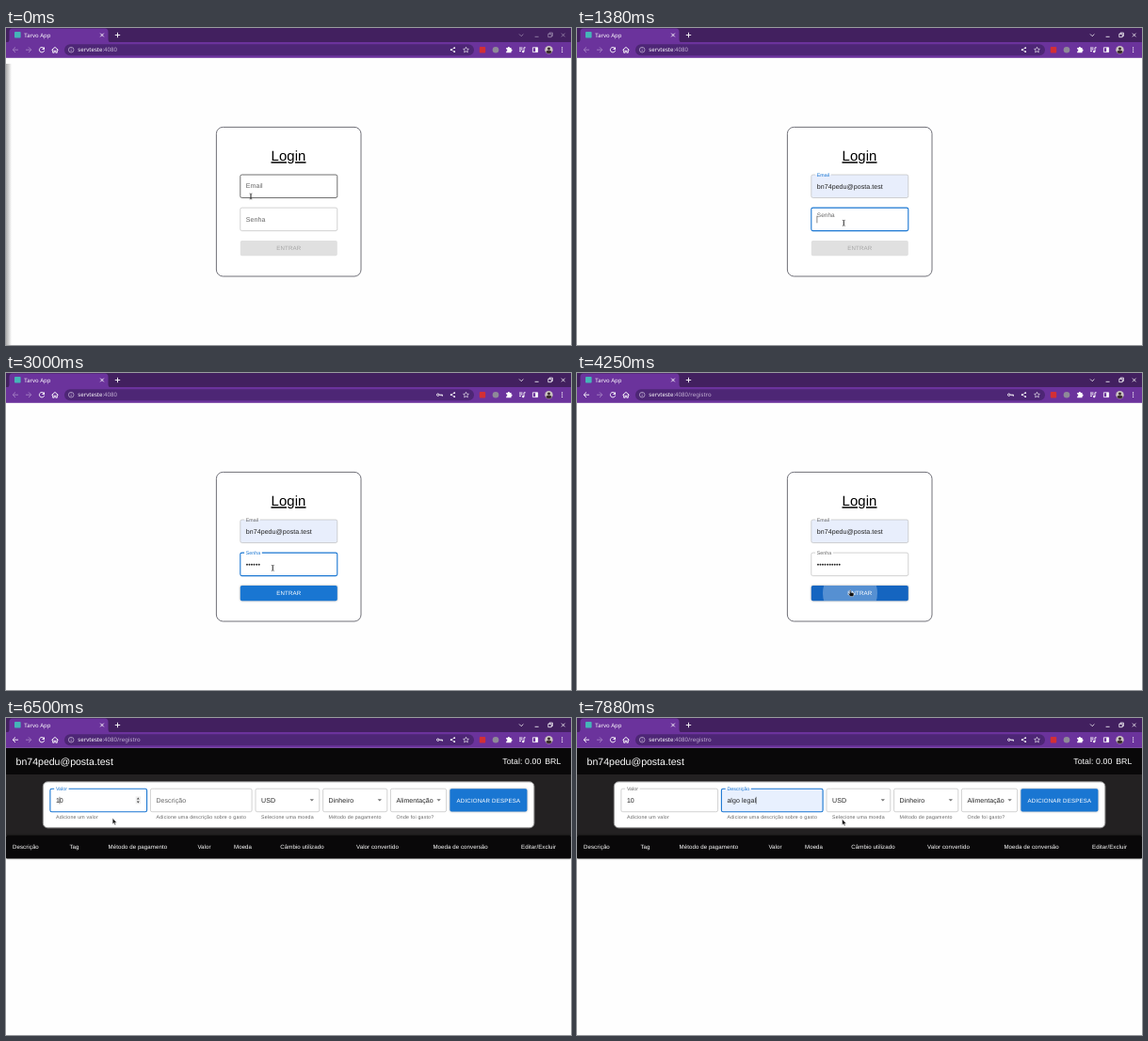
Recreate the animation shown at these times as an HTML page. Size 600 px wide and 337 px high, loop 8 s.

```html
<!DOCTYPE html>
<html lang="pt">
<head>
<meta charset="utf-8">
<title>Login</title>
<style>
html, body { margin: 0; width: 100%; height: 100%; overflow: hidden; background: #fff; }
svg { display: block; width: 100vw; height: 100vh; }
text { font-family: "Liberation Sans", Arial, sans-serif; text-rendering: geometricPrecision; white-space: pre; }
.ui { font-family: "Noto Sans", sans-serif; }
.raised { filter: drop-shadow(0 .8px .8px rgba(0, 0, 0, .35)); }
</style>
</head>
<body>
<svg id="stage" viewBox="0 0 600 337">
  <defs>
    <linearGradient id="edge"><stop stop-color="#777" stop-opacity=".6"/><stop offset="1" stop-color="#777" stop-opacity="0"/></linearGradient>
    <clipPath id="enterClip"><rect x="248.8" y="226" width="103" height="16.2" rx="1.8"/></clipPath>
  </defs>
  <g id="scene"></g>
</svg>
<script>
const STEP = 125, LOOP = 8000;
const PX = 600 / 1366;              // size of one page pixel on the stage
const BODY = 16 * PX, SMALL = 12 * PX, BUTTON = 14 * PX;
const BLUE = '#1976d2', GREY = '#666', INK = '#212121';
const EMAIL = 'bn74pedu@posta.test';
const NAVIGATE = 34, WALLET = 35;   // steps at which address and page change

const scene = document.getElementById('scene');
const pen = document.createElement('canvas').getContext('2d');
pen.font = '100px "Liberation Sans", Arial, sans-serif';
const widthOf = s => (pen.measureText(s).width / 100 + s.length * .0094) * BODY;

const rect = (x, y, w, h, fill, r = 0, extra = '') =>
  `<rect x="${x}" y="${y}" width="${w}" height="${h}" rx="${r}" fill="${fill}" ${extra}/>`;
const circle = (x, y, r, fill) => `<circle cx="${x}" cy="${y}" r="${r}" fill="${fill}"/>`;
const line = (d, color = '#fff', width = .9) =>
  `<path d="${d}" fill="none" stroke="${color}" stroke-width="${width}"/>`;
const shape = (d, fill = '#fff', extra = '') => `<path d="${d}" fill="${fill}" ${extra}/>`;
const text = (s, x, y, size, fill, spacing = 0, extra = '') =>
  `<text x="${x}" y="${y}" font-size="${size}" fill="${fill}" letter-spacing="${spacing * size}" ${extra}>${s}</text>`;

// Rounded outline with an optional gap in the top edge
function outline(x, y, w, h, gap, color, width) {
  const r = 1.76, start = x + 4.3 + gap;
  return line(`M${start} ${y}H${x + w - r}q${r} 0 ${r} ${r}V${y + h - r}q0 ${r} ${-r} ${r}H${x + r}
    q${-r} 0 ${-r} ${-r}V${y + r}q0 ${-r} ${r} ${-r}H${x + 4.3}`, color, width);
}

// Text field that has the focus from step `from` up to step `to`
function field(k, { x, y, w, label, value = '', from, to, fill = 'none', hover, caretAt = value }) {
  const h = 24.5, focused = k >= from && k < to, labelFocused = k > from && k <= to;
  const shrink = value && k < from || k > from ? 1 : k === from ? (value ? 1 : .35) : 0;
  const scale = 1 - .25 * shrink, baseline = y + PX * (16 - 25 * shrink + 17 * scale);
  const border = focused ? BLUE : hover ? '#333' : '#bfbfbf';
  const caretX = x + 6.1 + widthOf(caretAt);
  return rect(x, y, w, h, fill, 1.76)
    + outline(x, y, w, h, shrink === 1 ? widthOf(label) * .75 + 3.2 : 0, border, focused ? 1.1 : .7)
    + text(label, x + 6, baseline, BODY * scale, labelFocused ? BLUE : GREY, .0094)
    + text(value, x + 6, y + 14.6, BODY, INK, .0094)
    + (focused && (k - from) % 8 < 4 ? line(`M${caretX} ${y + 8.6}v7.6`, '#111', .5) : '');
}

function select(x, w, value) {
  return outline(x, 75.2, w, 24.5, 0, '#bfbfbf', .7)
    + text(value, x + 6, 89.8, BODY, INK, .0094)
    + shape(`M${x + w - 10.2} 86.3h4.4l-2.2 2.2z`, '#757575');
}

function button(x, y, w, h, label, fill, ink) {
  return rect(x, y, w, h, fill, 1.76, ink === '#fff' ? 'class="raised"' : '')
    + text(label, x + w / 2, y + h / 2 + 2.2, BUTTON, ink, .02857, 'text-anchor="middle"');
}

function browser(k) {
  const away = k >= NAVIGATE, win = k < 2 ? '#a08fb0' : '#fff', dim = '#a583c4';
  const back = away ? '#fff' : dim;
  return rect(0, 0, 600, 16, '#42205f')
    + shape('M0 15.5Q3.5 15.5 3.5 12V4Q3.5 .5 7 .5H105Q108.5 .5 108.5 4V12Q108.5 15.5 112 15.5z', '#6b339c')
    + rect(0, 15, 600, 16.8, '#6b339c')
    + rect(62, 17.2, 435, 12, '#4d2675', 6)
    + rect(9, 4, 6.6, 6.6, '#45b5b8', .8)
    + text('Tarvo App', 19.3, 9.7, 6, '#fff', 0, 'class="ui"')
    + line('M100.2 5.7l3.6 3.6m0-3.6l-3.6 3.6M115.8 7.5h5.4m-2.7-2.7v5.4')
    // window controls
    + line('M545 6.5l2.2 2.2 2.2-2.2M561.6 9.3h4M575.8 6.3h3.4v3.4h-3.4zM577 6.3v-1.2h3.4v3.4h-1.2M589.9 5.7l3.6 3.6m0-3.6l-3.6 3.6', win, .8)
    // navigation
    + line('M13 23.2H7.4m2.6-2.8l-2.8 2.8 2.8 2.8', back)
    + line('M21 23.2h5.6m-2.6-2.8l2.8 2.8-2.8 2.8', dim)
    + line('M40.1 21.4a2.7 2.7 0 1 0 .6 2.4') + shape('M41 19.9v3h-3z')
    + line('M48.5 23.4l3.5-3 3.5 3M49.7 22.8v3.4h1.5v-2h1.6v2h1.5v-3.4')
    + line('M66.4 23.2a2.8 2.8 0 1 0 5.6 0a2.8 2.8 0 1 0-5.6 0M69.2 22.8v2m0-3.4v.7', '#e0d5ea', .6)
    + `<text class="ui" x="76.3" y="25.3" font-size="6.1" fill="#fff">servteste<tspan fill="#c4b3d4">:4080${away ? '/registro' : ''}</tspan></text>`
    // address bar actions
    + (k >= 15 ? line('M457.5 23.2a1.2 1.2 0 1 0 2.4 0a1.2 1.2 0 1 0-2.4 0M460 23.2h3.5v1.4m-1.4-1.4v1.2') : '')
    + line('M476.1 21.2l-3.4 2 3.4 2', '#fff', .6)
    + circle(476.2, 21.2, .9, '#fff') + circle(472.7, 23.2, .9, '#fff') + circle(476.2, 25.2, .9, '#fff')
    + line('M488.5 20.3l.9 1.9 2 .2-1.5 1.4.4 2.1-1.8-1.1-1.8 1.1.4-2.1-1.5-1.4 2-.2z', '#fff', .6)
    // extensions and menu
    + rect(502.8, 20, 6.4, 6.4, '#d32f35', 1) + circle(520, 23.2, 3.3, '#8e8a98')
    + shape('M531.2 21h1.6a1.1 1.1 0 0 1 2.2 0h1.5v1.6a1.1 1.1 0 0 1 0 2.2v1.5h-5.3v-1.5a1.1 1.1 0 0 0 0-2.2z')
    + line('M545 21h3.5m-3.5 1.8h3.5m-3.5 1.8h2M550 25v-4.2h1.7') + circle(549.2, 25.1, 1.2, '#fff')
    + line('M559.4 20.8h5.2v4.8h-5.2z', '#fff', .8) + rect(562.2, 20.8, 2.4, 4.8, '#fff')
    + circle(576.5, 23.2, 4.2, '#c9c3c0') + circle(576.5, 22, 1.5, '#3a2b2e') + shape('M573.5 26.1q0-2.4 3-2.4t3 2.4q-3 2.4-6 0z', '#3a2b2e')
    + [21, 23.2, 25.4].map(y => circle(590.6, y, .65, '#fff')).join('');
}

function passwordLength(k) {
  if (k < 15) return 0;
  if (k < 22) return Math.min(4, k - 14);
  if (k < 25) return Math.min(6, k - 17);
  return Math.min(10, k - 18);
}

function loginPage(k) {
  const count = passwordLength(k);
  const fill = count < 6 ? '#e0e0e0' : k < 24 ? '#7aa9d9' : k >= 32 ? '#1565c0' : BLUE;
  const ripple = k === 33 ? 12 : k === 34 ? 29 : 0;
  return rect(223.4, 105.4, 153.6, 158.6, '#fff', 7, 'stroke="#707078" stroke-width="1"')
    + text('Login', 300, 141.2, 34 * PX, '#000', .00735, 'text-anchor="middle" text-decoration="underline"')
    + field(k, { x: 248.8, y: 156, w: 103, label: 'Email', value: k >= 9 ? EMAIL : '', from: 3, to: 11,
        fill: k >= 9 ? '#e8eefc' : 'none', hover: k < 3 })
    + field(k, { x: 248.8, y: 191.1, w: 103, label: 'Senha', value: '•'.repeat(count), from: 11, to: 33 })
    + button(248.8, 226, 103, 16.2, 'ENTRAR', fill, count < 6 ? '#a6a6a6' : '#fff')
    + `<g clip-path="url(#enterClip)" opacity=".28">${circle(290, 234, ripple, '#fff')}</g>`;
}

function walletPage(k) {
  const description = k < 57 ? '' : k < 60 ? 'algo'.slice(0, k - 56) : 'algo legal';
  const amountFocused = k >= 49 && k < 55;
  const helpers = [['Adicione um valor', 53], ['Adicione uma descrição sobre o gasto', 159.5],
    ['Selecione uma moeda', 271], ['Método de pagamento', 342.6], ['Onde foi gasto?', 414.5]];
  const columns = [['Descrição', 7], ['Tag', 67.4], ['Método de pagamento', 108.6], ['Valor', 203.4], ['Moeda', 242],
    ['Câmbio utilizado', 291.3], ['Valor convertido', 372], ['Moeda de conversão', 453.4], ['Editar/Excluir', 547]];
  return rect(0, 31.7, 600, 28.4, '#090809')
    + text(EMAIL, 10.6, 49.7, 24 * PX, '#fff')
    + text('Total: 0.00', 527.2, 49.2, 20 * PX, '#fff', .0075)
    + text('BRL', 572.2, 49.2, 20 * PX, '#fff', .0075)
    + rect(0, 60, 600, 65, '#232122')
    + rect(39.3, 67.8, 521.6, 49, '#fff', 5, 'stroke="#8c8c8c" stroke-width="1"')
    + field(k, { x: 46.9, y: 75.2, w: 102.7, label: 'Valor', value: k >= 51 ? '10' : '0', from: 49, to: 55, caretAt: k >= 51 ? '1' : '' })
    + (amountFocused ? rect(137.6, 83.4, 5.4, 8, '#efefef') + shape('M138.9 86.4l1.4-1.8 1.4 1.8zM138.9 88.6l1.4 1.8 1.4-1.8z', '#444') : '')
    + field(k, { x: 153.4, y: 75.2, w: 107.7, label: 'Descrição', value: description, from: 55, to: 64,
        fill: k >= 60 ? '#e8f0fe' : 'none' })
    + select(265, 67.8, 'USD') + select(336.6, 68.2, 'Dinheiro') + select(408.4, 59.2, 'Alimentação')
    + button(471.4, 75.2, 82, 24.2, 'ADICIONAR DESPESA', BLUE, '#fff')
    + helpers.map(([s, x]) => text(s, x, 106.6, SMALL, GREY, .0333)).join('')
    + rect(0, 124.8, 600, 24.8, '#090809', 1, 'class="raised"')
    + columns.map(([s, x]) => text(s, x, 139.2, BUTTON, '#fff', .0107)).join('');
}

// Pointer stops: step, x, y
const POINTER = [[0, 260, 179], [6, 260, 179], [10, 283.3, 207.3], [28, 283.3, 207.3], [32, 291, 234], [35, 291, 234],
  [40, 169.3, 218.5], [42, 169.3, 218.5], [47, 55, 88], [49, 55, 88], [52, 113.2, 106.6], [53, 113.2, 106.6],
  [55, 200, 88], [58, 200, 88], [62, 281.6, 107.6], [64, 281.6, 107.6]];

function pointer(k) {
  const i = POINTER.findIndex(stop => stop[0] > k);
  const [k0, x0, y0] = POINTER[i - 1], [k1, x1, y1] = POINTER[i];
  const p = (k - k0) / (k1 - k0), ease = p * p * (3 - 2 * p);
  const x = x0 + (x1 - x0) * ease, y = y0 + (y1 - y0) * ease;
  const within = (top, bottom) => y > top && y < bottom;
  const overText = k >= WALLET ? within(75, 100) : within(156, 181) || within(191, 216);
  let picture;
  if (overText) picture = line('M-1.4-3q1.4 0 1.4.8V2.2q0 .8-1.4.8M1.4-3q-1.4 0-1.4.8V2.2q0 .8 1.4.8', '#333', .7);
  else if (k < WALLET && y > 226) picture = shape('M-1.4-3q.7-.7 1.2 0v2.2l2.6.6q.8.3.6 1.2l-.5 2.6h-3.4l-2-2.8q.2-.9 1.5 0z', '#111', 'stroke="#fff" stroke-width=".4"');
  else picture = shape('M0 0v6.2l1.4-1.3 1 2.3 1-.5-1-2.1h2z', '#111', 'stroke="#fff" stroke-width=".4"');
  return `<g transform="translate(${x} ${y})">${picture}</g>`;
}

let shown = -1;
function tick() {
  const k = Math.floor(performance.now() % LOOP / STEP);
  if (k !== shown) {
    shown = k;
    const shade = k < 2 ? 1 : k === 2 ? .5 : 0;
    scene.innerHTML = rect(0, 0, 600, 337, '#fefefe')
      + (k < WALLET ? loginPage(k) : walletPage(k))
      + rect(0, 38, 6, 299, 'url(#edge)', 0, `opacity="${shade}"`)
      + browser(k) + pointer(k);
  }
  requestAnimationFrame(tick);
}
tick();
</script>
</body>
</html>
```
